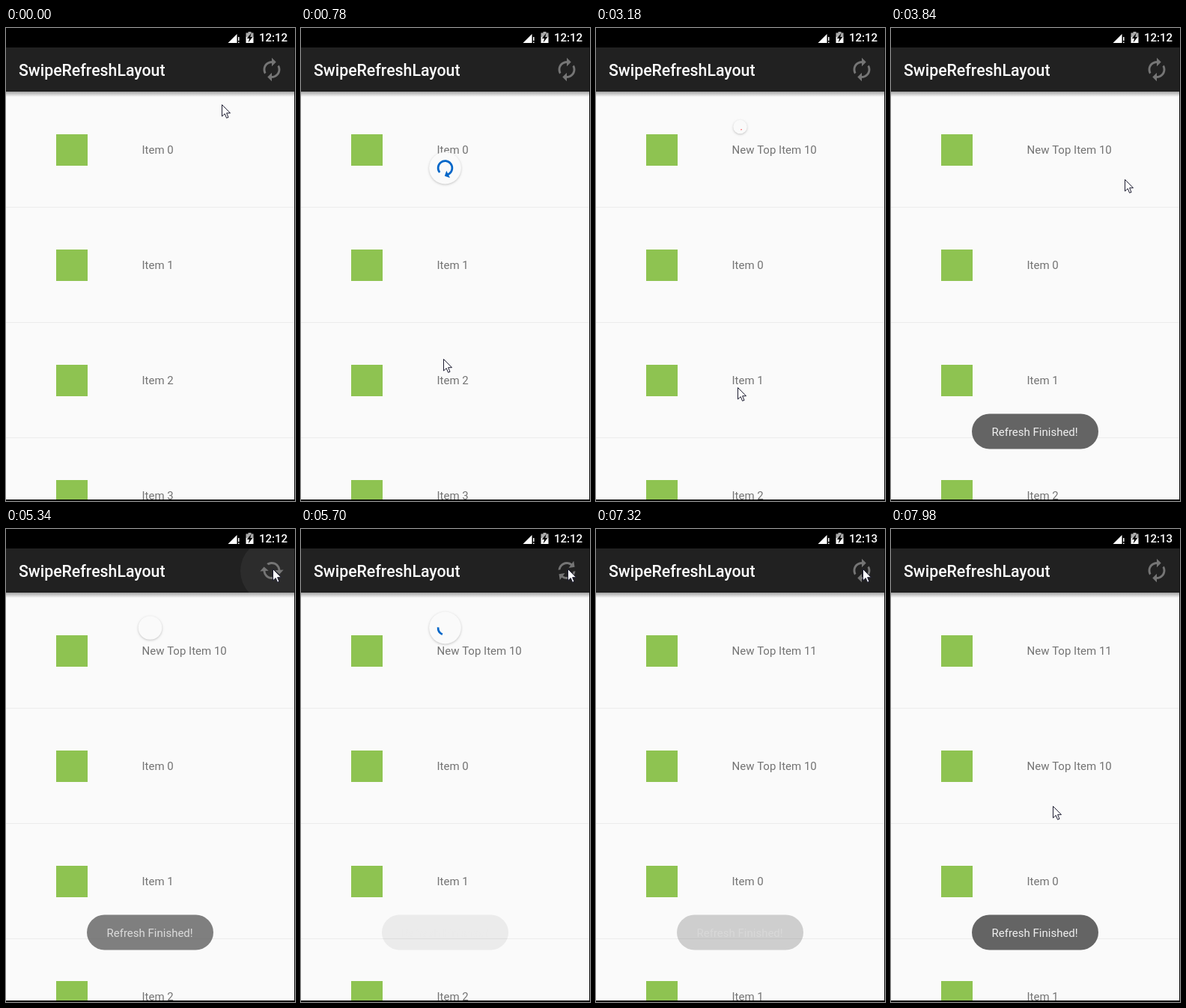
An HTML page with a canvas for the animation above (8 s loop, 386 by 632 pixels).

```html
<!DOCTYPE html>
<html lang="en">
<head>
<meta charset="utf-8">
<title>Swipe to refresh</title>
<style>
  html, body { margin: 0; width: 100%; height: 100%; overflow: hidden; background: #fafafa; }
  canvas { display: block; }
</style>
</head>
<body>
<canvas width="386" height="632"></canvas>
<script>
const ctx = document.querySelector('canvas').getContext('2d');
const LOOP = 8000, STEP = 60, TURN = Math.PI * 2;
const FONT = 'Roboto, "Noto Sans", sans-serif';
const CX = 192.5, REST_Y = 132, SLING = 68.6, DRAG_FROM = 152;
const RELEASE = 930, SPIN = 1180, FINISH = 666, CYCLE = 1333, TILT = -0.085;
const TAP = 5010, TAP_SPIN = 5530, DONE = [3095, 7100];
const COLORS = [[2, 102, 200], [0, 147, 59], [249, 1, 1], [242, 181, 15]];

// Pointer path: time, x, y
const POINTER = [
  [0, 288, 102], [300, 194, 152], [420, 194, 152], [840, 189, 490], [960, 189, 480],
  [3540, 189, 480], [3660, 255, 402], [3720, 284, 325], [3780, 302, 260], [3840, 312, 202],
  [3960, 324, 118], [4140, 365, 57], [4500, 365, 57], [4740, 356, 53], [7560, 356, 53],
  [7860, 246, 268], [7980, 216, 370]
];

const arrow = new Path2D('M.5 .5V16L4.2 12.6 6.6 18.3 9 17.3 6.6 11.7H11.5Z');
const renew = new Path2D('M12 6v3l4-4-4-4v3c-4.42 0-8 3.58-8 8 0 1.57.46 3.03 1.24 4.26L6.7 14.8c-.45-.83-.7-1.79-.7-2.8 0-3.31 2.69-6 6-6zm6.76 1.74L17.3 9.2c.44.84.7 1.79.7 2.8 0 3.31-2.69 6-6 6v-3l-4 4 4 4v-3c4.42 0 8-3.58 8-8 0-1.57-.46-3.03-1.24-4.26z');
const signal = new Path2D('M296.5 20L308.5 8V20Z');
const bolt = new Path2D('M327.5 7L321.7 14H325L323.6 19.5 329.4 12H326.2Z');

const clamp = x => Math.max(0, Math.min(1, x));
const ramp = (t, from, length) => clamp((t - from) / length);
const mix = (a, b, x) => a + (b - a) * x;
const smooth = x => (1 - Math.cos(x * Math.PI)) / 2;

// cubic-bezier(.4, 0, .2, 1)
function ease(x) {
  let lo = 0, hi = 1, s = 0.5;
  for (let i = 0; i < 20; i++) {
    const u = 1 - s;
    if (1.2 * u * u * s + 0.6 * u * s * s + s ** 3 < x) lo = s; else hi = s;
    s = (lo + hi) / 2;
  }
  return 3 * (1 - s) * s * s + s ** 3;
}

function pointerAt(t) {
  const i = POINTER.findIndex(p => p[0] > t);
  if (i < 0) return POINTER[POINTER.length - 1].slice(1);
  const [t0, x0, y0] = POINTER[i - 1], [t1, x1, y1] = POINTER[i];
  const k = (t - t0) / (t1 - t0);
  return [mix(x0, x1, k), mix(y0, y1, k)];
}

function rect(x, y, w, h, color) {
  ctx.fillStyle = color;
  ctx.fillRect(x, y, w, h);
}

function text(str, x, y, size, color, weight = 400) {
  ctx.font = `${weight} ${size}px ${FONT}`;
  ctx.fillStyle = color;
  ctx.fillText(str, x, y);
}

function disc(x, y, r, color) {
  ctx.fillStyle = color;
  ctx.beginPath();
  ctx.arc(x, y, r, 0, TURN);
  ctx.fill();
}

// How far the badge hangs and how its arc looks for a drag of dy
function pull(dy) {
  const over = Math.max(0, dy) / 2, drag = Math.min(1, over / SLING);
  const q = Math.max(0, Math.min(over - SLING, 2 * SLING)) / SLING / 4;
  const tension = (q - q * q) * 2, grow = Math.max(0, drag - 0.4) * 5 / 3;
  return {
    y: REST_Y - SLING + SLING * drag + 2 * SLING * tension,
    start: 0, end: 0.8 * grow, head: grow, scale: 1,
    turn: (-0.25 + 0.4 * grow + 2 * tension) / 2 + TILT,
    alpha: drag < 1 ? 0.3 : 1, color: COLORS[0]
  };
}

function spin(elapsed, base, first) {
  const k = Math.floor(elapsed / CYCLE), x = elapsed / CYCLE - k;
  const a = COLORS[(first + k) % 4], b = COLORS[(first + k + 1) % 4];
  const start = 0.8 * ease(clamp(2 * x - 1));
  return {
    y: REST_Y, scale: 1, head: 0, alpha: 1, start,
    end: Math.max(start + 0.045, 0.8 * ease(clamp(2 * x))),
    turn: base + 1.45 * k + 0.65 * x,
    color: a.map((v, i) => Math.round(mix(v, b[i], clamp(4 * x - 3))))
  };
}

function badgeAt(t) {
  if (t > 420 && t < SPIN + FINISH) {
    const p = pull(pointerAt(Math.min(t, 840))[1] - DRAG_FROM);
    if (t > RELEASE) p.y = mix(p.y, REST_Y, 1 - (1 - ramp(t, RELEASE, 250)) ** 4);
    if (t > SPIN) {
      const x = ramp(t, SPIN, FINISH);
      p.start = 0.8 * x;
      p.turn = mix(p.turn, 1 + TILT, x);
      p.head = 0;
    }
    return p;
  }
  if (t >= SPIN && t < TAP) {
    const b = spin(t - SPIN - FINISH, 1.8 + TILT, 1);
    b.scale = 1 - ramp(t, DONE[0], 150);
    return b;
  }
  if (t >= TAP) {
    const b = spin(Math.max(0, t - TAP_SPIN), 0.23, 0);
    if (t < TAP_SPIN) b.alpha = 0;
    b.scale = smooth(ramp(t, TAP, 500)) * (1 - ramp(t, DONE[1], 150));
    return b;
  }
}

function drawBadge(b) {
  if (!b || b.scale <= 0) return;
  ctx.save();
  ctx.translate(CX, b.y);
  ctx.scale(b.scale, b.scale);
  ctx.shadowColor = 'rgba(0,0,0,.22)';
  ctx.shadowBlur = 3;
  ctx.shadowOffsetY = 1;
  disc(0, 0, 21.4, '#fafafa');
  ctx.shadowColor = 'transparent';
  ctx.globalAlpha = b.alpha;
  ctx.strokeStyle = ctx.fillStyle = `rgb(${b.color})`;
  ctx.lineWidth = 2.7;
  ctx.rotate(b.turn * TURN);
  ctx.beginPath();
  ctx.arc(0, 0, 9.4, b.start * TURN, b.end * TURN);
  ctx.stroke();
  if (b.head) {
    const s = 5.36 * b.head;
    ctx.rotate(b.end * TURN - 0.09);
    ctx.beginPath();
    ctx.moveTo(9.4 - s, 0);
    ctx.lineTo(9.4 + s, 0);
    ctx.lineTo(9.4, s);
    ctx.fill();
  }
  ctx.restore();
}

function drawList(t) {
  rect(0, 0, 386, 632, '#fafafa');
  const added = DONE.filter(d => t >= d).length;
  for (let i = 0; i < 4; i++) {
    const y = 85 + 154 * i, n = i - added;
    rect(67, y + 57, 42, 42, '#8ec351');
    text(n < 0 ? `New Top Item ${9 - n}` : `Item ${n}`, 181.5, y + 83, 15, '#737373');
    rect(0, y + 154, 386, 1, '#ececec');
  }
}

function drawHeader(t) {
  const shade = ctx.createLinearGradient(0, 85, 0, 92);
  shade.addColorStop(0, 'rgba(0,0,0,.35)');
  shade.addColorStop(1, 'rgba(0,0,0,0)');
  rect(0, 85, 386, 7, shade);
  rect(0, 26, 386, 59, '#212121');

  const glow = 0.05 * (1 - ramp(t, 5400, 300));
  if (t >= 5040 && glow > 0) {
    ctx.save();
    ctx.beginPath();
    ctx.rect(0, 26, 386, 59);
    ctx.clip();
    disc(355, 56, 42 * ramp(t, 5040, 250), `rgba(255,255,255,${glow})`);
    ctx.restore();
  }

  text('SwipeRefreshLayout', 17, 64, 21.3, '#fff', 500);
  ctx.save();
  ctx.translate(355, 55.5);
  if (t > 5100 && t < DONE[1]) ctx.rotate((t - 5100) / 1000 * TURN);
  ctx.scale(1.43, 1.43);
  ctx.translate(-12, -12);
  ctx.fillStyle = '#757575';
  ctx.fill(renew);
  ctx.restore();

  rect(0, 0, 386, 26, '#000');
  ctx.fillStyle = '#fff';
  ctx.fill(signal);
  rect(310, 12, 1.5, 5, '#fff');
  rect(310, 18.5, 1.5, 1.5, '#fff');
  rect(323.5, 5, 4, 2, '#aaa');
  rect(320.5, 6.5, 10, 5, '#aaa');
  rect(320.5, 11.5, 10, 8.5, '#fff');
  ctx.fillStyle = '#000';
  ctx.fill(bolt);
  text(t < DONE[1] ? '12:12' : '12:13', 338, 18, 15, '#fff', 500);
}

function drawToast(t) {
  const alpha = t < 6000 ? ramp(t, 3230, 350) * (1 - ramp(t, 5250, 500)) : ramp(t, 7220, 340);
  if (!alpha) return;
  ctx.globalAlpha = alpha;
  ctx.fillStyle = '#646464';
  ctx.beginPath();
  ctx.roundRect(108, 515.5, 169, 47, 23.5);
  ctx.fill();
  text('Refresh Finished!', 134.5, 545, 15, '#f0f0f0');
  ctx.globalAlpha = 1;
}

function drawPointer(t) {
  ctx.save();
  ctx.translate(...pointerAt(t).map(Math.round));
  ctx.fillStyle = '#fff';
  ctx.fill(arrow);
  ctx.strokeStyle = '#1c1c30';
  ctx.lineWidth = 1;
  ctx.stroke(arrow);
  ctx.restore();
}

function frame() {
  const now = performance.now() % LOOP, t = Math.floor(now / STEP) * STEP;
  drawList(t);
  drawBadge(badgeAt(t));
  drawHeader(t);
  drawToast(t);
  rect(385, 26, 1, 606, '#111');
  rect(0, 630, 386, 2, '#000');
  drawPointer(t);
  requestAnimationFrame(frame);
}
frame();
</script>
</body>
</html>
```
